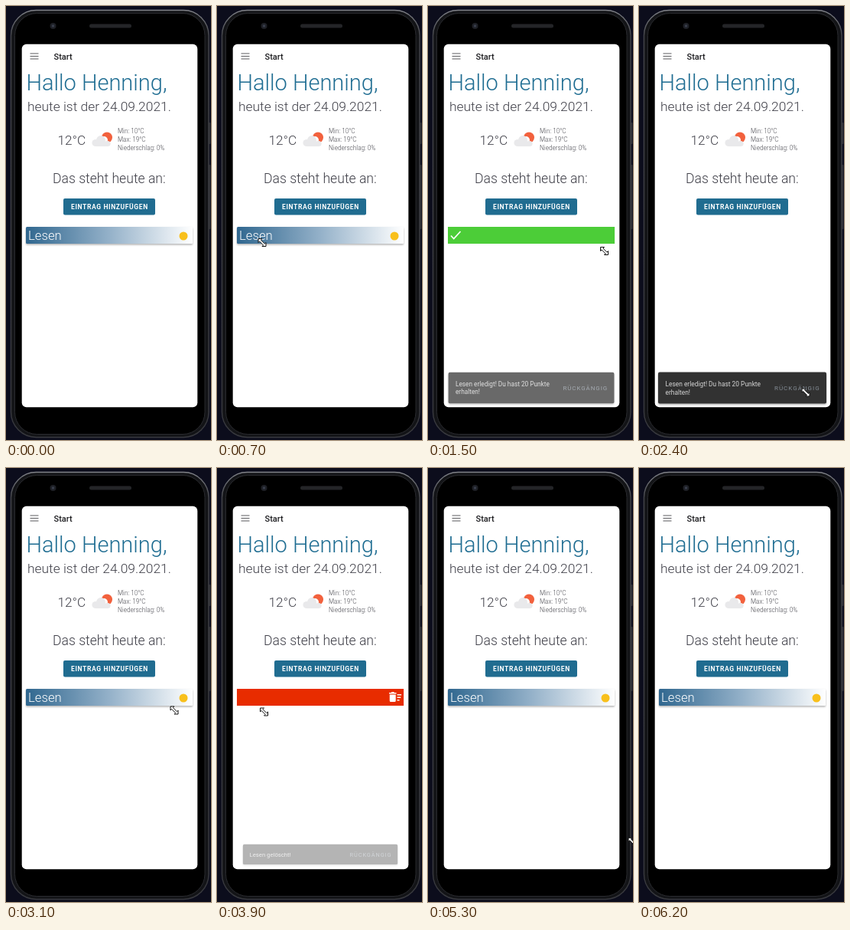
Recreate the animation shown at these times as an HTML page. Size 268 px wide and 566 px high, loop 6700 ms.

```html
<!DOCTYPE html>
<html lang="de">
<head>
<meta charset="utf-8">
<style>
html, body { margin: 0; width: 100%; height: 100%; overflow: hidden; background: #0c0d1c; }
svg { display: block; font-family: Roboto, sans-serif; }
.light { font-weight: 300; fill: #3e3e47; }
.small { font-weight: 300; font-size: 8.2px; fill: #4b4b52; }
.snack text { font-size: 8.4px; fill: #d4d4d4; }
.snack .undo { font-size: 8px; letter-spacing: 1px; fill: #858d96; }
</style>
</head>
<body>
<svg width="268" height="566" viewBox="0 0 268 566">
  <defs>
    <linearGradient id="blue">
      <stop offset="0" stop-color="#30678f"/>
      <stop offset=".5" stop-color="#94b1c9"/>
      <stop offset="1" stop-color="#fff"/>
    </linearGradient>
    <linearGradient id="rim" x2="0" y2="1">
      <stop offset="0" stop-color="#808288"/>
      <stop offset=".06" stop-color="#45464b"/>
      <stop offset="1" stop-color="#38393e"/>
    </linearGradient>
    <filter id="shadow" x="-10%" y="-30%" width="120%" height="180%">
      <feDropShadow dx="0" dy="1.5" stdDeviation="1.2" flood-opacity=".3"/>
    </filter>
    <clipPath id="clip"><rect x="20.7" y="49.7" width="229.6" height="473.6" rx="6"/></clipPath>
  </defs>

  <!-- phone -->
  <g fill="#2c2d32">
    <rect x="264" y="152" width="3.500" height="28" rx="1"/>
    <rect x="264" y="207" width="3.500" height="84" rx="1"/>
  </g>
  <rect x="6.5" y="5.5" width="258.500" height="557" rx="33" fill="#131417" stroke="url(#rim)" stroke-width="1.4"/>
  <rect x="11.5" y="9.5" width="248.500" height="549" rx="29" stroke="#2a2b2f"/>
  <rect x="109" y="23.5" width="55" height="5" rx="2.5" fill="#242528"/>
  <circle cx="61.5" cy="26" r="4" fill="#1e2026"/>
  <circle cx="61.5" cy="26" r="1.7" fill="#3a3f4c"/>

  <g clip-path="url(#clip)">
    <rect x="20" y="49" width="231" height="475" fill="#fff"/>
    <path d="M31.5 62h11M31.5 65.5h11M31.5 69h11" stroke="#5b5b5f" stroke-width="1.1"/>
    <text x="62.5" y="70" font-size="11" font-weight="500" fill="#1d1d20">Start</text>
    <text x="26.5" y="110" font-size="29" font-weight="300" fill="#1f6d92">Hallo Henning,</text>
    <text class="light" x="28" y="137" font-size="17.4">heute ist der 24.09.2021.</text>
    <text class="light" x="67.5" y="181" font-size="17.2">12°C</text>

    <!-- weather -->
    <circle cx="132" cy="171.500" r="7" fill="#f2613d"/>
    <circle cx="128" cy="175" r="5" fill="#fff"/>
    <g fill="#e9e9eb">
      <circle cx="117" cy="178.500" r="4.600"/>
      <circle cx="124" cy="175" r="6"/>
      <circle cx="133" cy="179.500" r="3.600"/>
      <rect x="117" y="176.500" width="16" height="6.600"/>
    </g>
    <text class="small" x="146" y="166.200">Min: 10°C</text>
    <text class="small" x="146" y="177.200">Max: 19°C</text>
    <text class="small" x="146" y="188.300">Niederschlag: 0%</text>

    <text class="light" x="61" y="231" font-size="17.6">Das steht heute an:</text>
    <rect x="75" y="251" width="120" height="21.500" rx="2" fill="#206c90"/>
    <text x="85" y="265" font-size="8.5" font-weight="700" letter-spacing=".63" fill="#fff">EINTRAG HINZUFÜGEN</text>

    <!-- swipe backgrounds -->
    <g id="done">
      <rect x="26" y="288" width="218" height="22" fill="#4ccd38"/>
      <path d="M30 299.500l3.700 4 8.800-9.500" fill="none" stroke="#fff" stroke-width="1.700"/>
    </g>
    <g id="trash">
      <rect x="26" y="288" width="218" height="22" fill="#e82c00"/>
      <path d="M225 293h2.500l1-1h2.500l1 1h2.500v1.500h-9.500zM225.700 295.500h8v8q0 1.500-1.500 1.500h-5q-1.500 0-1.500-1.500zM235.500 295h5.500v1.600h-5.500zM235.500 298.500h4.700v1.600h-4.700zM235.500 302h3v1.600h-3z" fill="#fff"/>
    </g>

    <g id="card">
      <rect x="26" y="288" width="218" height="22" rx="1.5" fill="url(#blue)" filter="url(#shadow)"/>
      <text x="29" y="305.300" font-size="16.700" font-weight="300" fill="#fff">Lesen</text>
      <circle cx="232" cy="300" r="5.500" fill="#f8c01c"/>
    </g>

    <g id="snackDone" class="snack">
      <rect x="25" y="477.500" width="220" height="41" rx="2" fill="#323232" filter="url(#shadow)"/>
      <text x="34.500" y="496">Lesen erledigt! Du hast 20 Punkte</text>
      <text x="34.500" y="506.500">erhalten!</text>
      <text class="undo" x="177" y="501">RÜCKGÄNGIG</text>
    </g>
    <g id="snackTrash" class="snack">
      <rect x="25" y="489.700" width="220" height="28.500" rx="2" fill="#323232" filter="url(#shadow)"/>
      <text x="34.500" y="507">Lesen gelöscht!</text>
      <text class="undo" x="177" y="507">RÜCKGÄNGIG</text>
    </g>
  </g>

  <path id="cursor" d="M-5-5h5l-1.600 1.600 5 5 1.600-1.600v5h-5l1.600-1.600-5-5-1.600 1.600z" fill="#fff" stroke="#111" stroke-width="1"/>
</svg>
<script>
const LOOP = 6700, STEP = 100;
const el = id => document.getElementById(id);
const ramp = (t, a, b) => Math.min(1, Math.max(0, (t - a) / (b - a)));
const smooth = p => p * p * (3 - 2 * p);
const within = (t, a, b) => t >= a && t < b;

// time, x, y of the pointer
const path = [
  [0, 235, 520], [700, 59, 308.5], [750, 59, 308.5], [1400, 230.5, 319.5], [1700, 230.5, 319.5],
  [2400, 218, 504], [2500, 218, 504], [3100, 220, 316], [3150, 220, 316], [3800, 61.5, 318],
  [3900, 61.5, 318], [4500, 214, 497], [4800, 218.5, 516], [5000, 218.5, 516], [5400, 276, 482]
];

function pointer(t) {
  const i = path.findIndex(k => k[0] > t);
  if (i < 1) return path[path.length - 1].slice(1);
  const [a, x, y] = path[i - 1], [b, u, v] = path[i];
  const p = smooth(ramp(t, a, b));
  return [x + (u - x) * p, y + (v - y) * p];
}

function show(id, alpha, transform = "") {
  const node = el(id);
  node.setAttribute("opacity", alpha);
  node.setAttribute("transform", transform);
}

function snack(id, t, start, end, cy) {
  const p = ramp(t, start, start + 137);
  const scale = .8 + .2 * (1 - (1 - p) ** 2);
  show(id, t < end ? p : 0, `translate(135 ${cy}) scale(${scale}) translate(-135 ${-cy})`);
}

function draw(t) {
  const [x, y] = pointer(t);
  show("cursor", within(t, 100, 5400) ? 1 : 0, `translate(${x} ${y})`);

  let shift = 0, alpha = 1;
  if (within(t, 750, 1500)) shift = x - 59 + 60 * ramp(t, 1200, 1500);
  else if (within(t, 3150, 3900)) shift = x - 220 - 80 * ramp(t, 3600, 3900);
  else if (within(t, 1500, 3150)) alpha = ramp(t, 2500, 2700);
  else if (t >= 3900) alpha = ramp(t, 5000, 5200);
  show("card", alpha, `translate(${shift} 0)`);

  show("done", within(t, 800, 1600) ? 1 : 0);
  show("trash", within(t, 3200, 4000) ? 1 : 0);
  snack("snackDone", t, 1400, 2600, 498);
  snack("snackTrash", t, 3850, 5100, 504);
}

function tick() {
  draw(Math.floor(performance.now() % LOOP / STEP) * STEP);
  requestAnimationFrame(tick);
}
tick();
</script>
</body>
</html>
```
